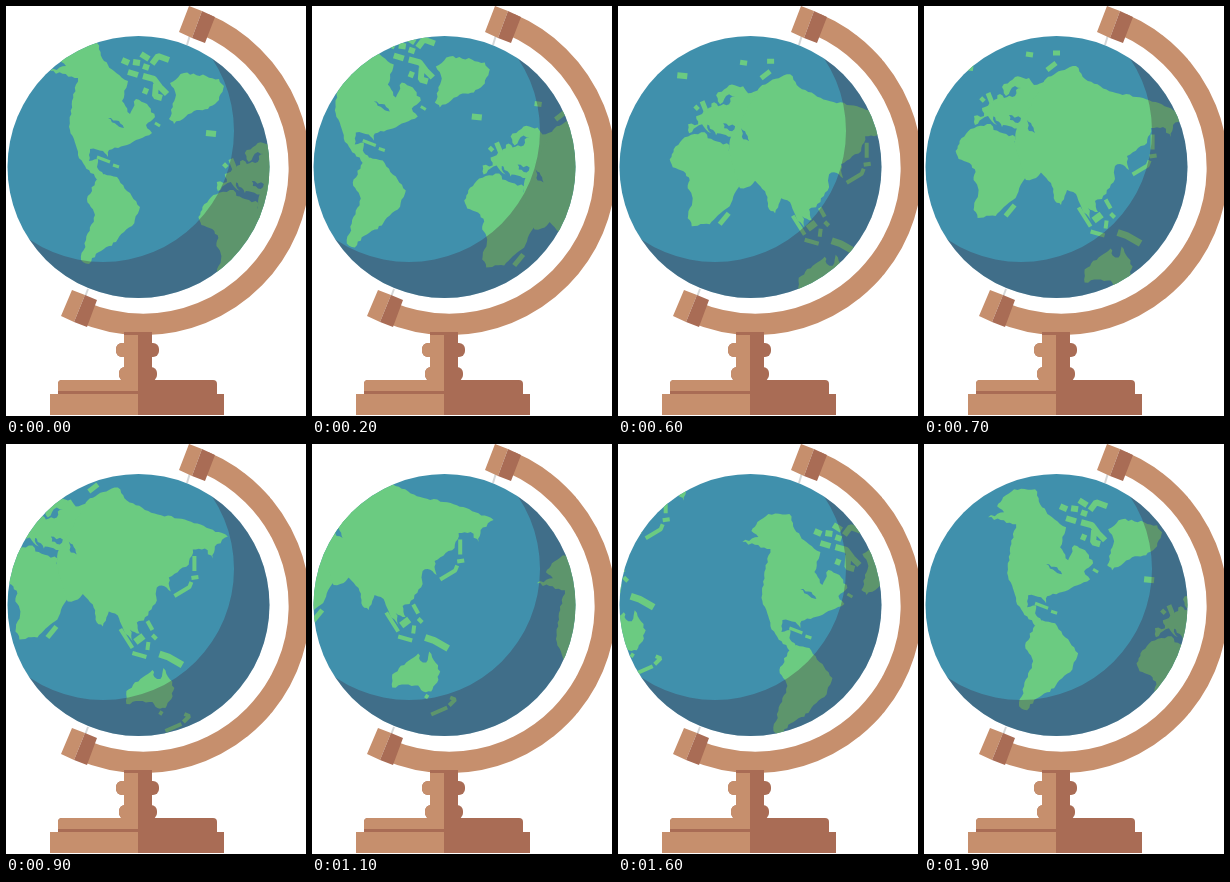
Write an HTML page that moves like this. It is 300 px wide and 410 px high and loops after 2 s.

```html
<!DOCTYPE html>
<html lang="en">
<head>
<meta charset="utf-8">
<title>Spinning globe</title>
<style>
  html, body { margin: 0; width: 100%; height: 100%; overflow: hidden; background: #fff; }
  svg { display: block; width: 300px; height: 410px; }
  .light { fill: #c68f6d; }
  .dark { fill: #a96c55; }
  .ocean { fill: #4090ac; }
  .land { fill: #6bcb81; }
  .isles { fill: none; stroke: #6bcb81; stroke-linejoin: bevel; }
</style>
</head>
<body>
<svg viewBox="0 0 300 410">
  <defs>
    <clipPath id="ball"><circle cx="132.5" cy="161" r="131"/></clipPath>
    <clipPath id="leftHalf"><path d="M0 325H132V410H0z"/></clipPath>
    <g id="world"></g>
    <g id="foot">
      <rect x="118" y="326" width="28" height="49"/>
      <rect x="110" y="337" width="43" height="14" rx="6"/>
      <rect x="113" y="361" width="38" height="14" rx="6"/>
      <rect x="52" y="374" width="159" height="18" rx="4"/>
      <rect x="44" y="388" width="174" height="21"/>
    </g>
  </defs>

  <path d="M184 29L181 39M82 283L79 291" stroke="#d6d8d9" stroke-width="2"/>
  <circle class="ocean" cx="132.5" cy="161" r="131"/>
  <g clip-path="url(#ball)">
    <g id="map"></g>
    <path fill="#402840" fill-opacity=".33" fill-rule="evenodd"
      d="M0 0H300V300H0z M97 -6A131 131 0 0 1 97 256A131 131 0 0 1 97 -6z"/>
  </g>

  <path d="M198 18A156 156 0 0 1 76 306" fill="none" stroke="#c68f6d" stroke-width="21.5"/>
  <path class="light" d="M183 0L196 5 186 32 173 26z M66 284L79 289 68 316 55 310z"/>
  <path class="dark" d="M196 5L209 11 199 37 186 32z M79 289L91 294 81 321 68 316z"/>

  <use href="#foot" class="dark"/>
  <g clip-path="url(#leftHalf)">
    <use href="#foot" class="light"/>
    <path class="dark" d="M52 385H132V388H52z M118 326H132V329H118z"/>
  </g>
</svg>
<script>
const STEP = { x: 20.1, y: 8.25 };   // map travel per position, square to the tilted axis
const POSITIONS = 21;

const world = document.getElementById('world');
const map = document.getElementById('map');
const shift = n => `translate(${n * STEP.x} ${n * STEP.y})`;

let seed = 7;
const random = () => (seed = seed * 16807 % 2147483647) / 2147483647;

function add(parent, tag, attributes) {
  const node = document.createElementNS('http://www.w3.org/2000/svg', tag);
  for (const name in attributes) node.setAttribute(name, attributes[name]);
  parent.append(node);
}

// Breaks each edge into short pieces pushed sideways, for a ragged coast.
function coast(text) {
  const n = text.trim().split(/\s+/).map(Number);
  const points = [];
  for (let i = 0; i < n.length; i += 2) {
    const [x, y] = [n[i], n[i + 1]];
    const dx = n[(i + 2) % n.length] - x, dy = n[(i + 3) % n.length] - y;
    const length = Math.hypot(dx, dy), pieces = Math.ceil(length / 3.5);
    for (let j = 0; j < pieces; j++) {
      const push = j ? (random() - .5) * 2.4 / length : 0;
      points.push([x + dx * j / pieces - dy * push, y + dy * j / pieces + dx * push]);
    }
  }
  return `M${points.join(' ')}z`;
}

// Shapes are drawn where they lie when the map is at the given position.
function region(position, kind, outline) {
  add(world, 'path', { class: kind, transform: shift(position), d: coast(outline) });
}
function isles(position, width, lines) {
  add(world, 'path', { class: 'isles', transform: shift(position), 'stroke-width': width, d: lines });
}

// North America
region(0, 'land',
  `44 65 60 60 53 54 59 45 70 37 91 37 98 55 108 65 122 75 116 95 124 108
   130 93 141 98 149 111 140 119 146 127 130 134 121 139 103 144 102 151 97 145
   84 143 83 155 92 153 91 161 96 166 98 177 89 171 79 160 72 149 64 124 66 95 72 72`);
region(0, 'ocean', '102 112 113 115 118 122 111 119');
isles(0, 3, 'M91 151L104 156M107 159L113 161M149 117L154 120');

// Arctic islands and Greenland
isles(0, 6, `M116 54L123 57M122 66L132 69M127 56L134 57M137 60L143 62M135 48L143 53
  M146 58L152 50 163 54M137 70L148 73 154 81 161 88M150 78L149 90 156 92M137 84L142 86`);
region(0, 'land', '164 77 178 67 200 70 213 73 218 80 213 94 202 103 188 105 168 118 163 113 170 89');
isles(0, 6, 'M200 127L210 128');

// South America
region(0, 'land',
  `89 176 98 168 111 171 121 185 134 201 126 220 118 226 110 236 103 240 95 245
   86 252 83 258 75 254 80 234 89 209 81 193`);

// Africa and Madagascar
region(4, 'land',
  `127 156 147 151 150 157 172 164 171 169 181 192 190 196 177 212 172 225 165 230
   152 243 134 245 130 237 135 217 130 207 132 199 128 192 115 186 112 178 116 168`);
isles(4, 5, 'M171 232L162 243');

// Europe, then Asia
region(8, 'land',
  `51 119 50 110 60 110 58 102 69 96 76 88 80 92 91 90 92 84 97 82 91 80 82 90
   78 81 91 71 105 72 110 79 127 73 127 112 96 124 79 119 78 121 67 107 73 119 64 110`);
region(8, 'land',
  `120 75 132 67 152 60 161 73 192 87 219 92 262 109 249 119 247 131 239 121 227 122
   223 137 203 150 205 164 196 158 191 160 191 173 178 193 171 195 174 206 164 202
   168 217 158 203 152 188 143 184 137 199 131 195 127 177 105 155 118 165
   112 172 102 174 91 139 93 122`);
region(8, 'ocean', '85 109 97 112 94 117 86 114');
region(8, 'ocean', '103 114 107 117 111 127 105 125');
isles(8, 5, 'M64 87L68 97M57 95L60 92M102 48L109 49M123 64L132 57M129 47L136 47');

// Japan, southeast Asia, New Guinea, New Zealand
isles(14, 4, `M105 101L112 100M105 105L103 110 88 119M108 79L108 94
  M34 152L46 171M46 176L60 180M61 173L62 165M61 144L66 153M66 158L70 162
  M98 237L103 239 97 245M95 247L79 254M73 235L76 237`);
isles(14, 7, 'M49 165L57 159M73 177L82 180 96 188');
region(14, 'land',
  '40 214 54 202 66 193 68 200 74 202 77 191 88 211 85 222 79 231 71 231 66 225 53 224 40 227');

for (const turn of [-1, 0, 1]) add(map, 'use', { href: '#world', transform: shift(turn * POSITIONS) });

function draw() {
  const tick = Math.floor(performance.now() / 100) % 20;
  const position = tick < 6 ? tick : tick + 1;   // one double step per turn
  map.setAttribute('transform', shift(-position));
  requestAnimationFrame(draw);
}
draw();
</script>
</body>
</html>
```
